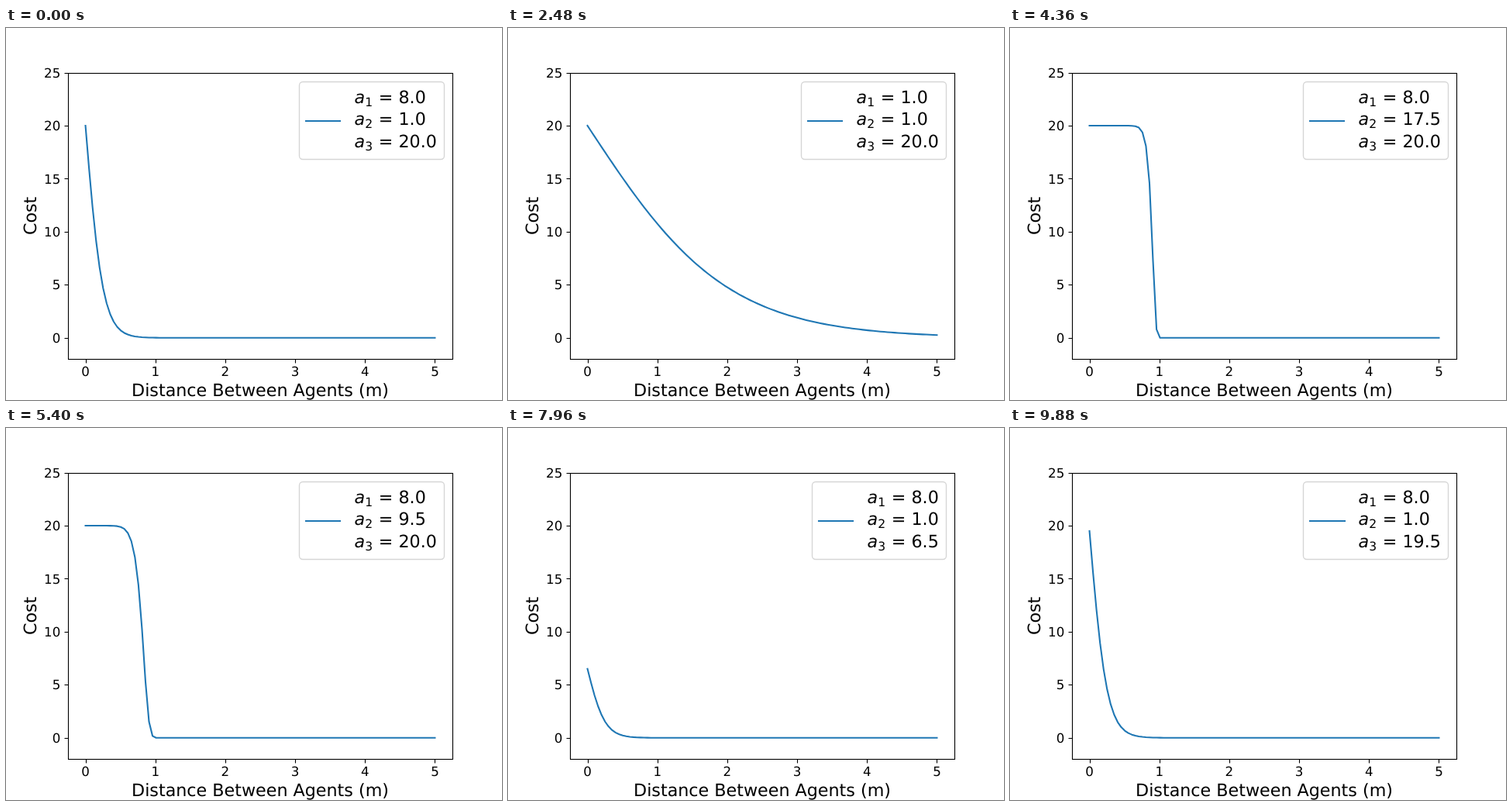
Recreate the animation shown at these times as an HTML page with a canvas. Size 640x480 px, loop 9920 ms.

```html
<!DOCTYPE html>
<html lang="en">
<head>
<meta charset="utf-8">
<title>Cost curve</title>
<style>
  html, body { margin: 0; width: 100%; height: 100%; overflow: hidden; background: #fff; }
  canvas { display: block; width: 640px; height: 480px; }
</style>
</head>
<body>
<canvas id="stage" width="640" height="480"></canvas>
<script>
const ctx = document.getElementById('stage').getContext('2d');
const STEP_MS = 40, STEPS = 248;
const BLUE = '#1f77b4';
const PT = 100 / 72;
const SMALL = 12 * PT, LARGE = 16 * PT;

const px = x => 80 + (x + 0.25) * 496 / 5.5;
const py = y => 427.2 - (y + 2) * 369.6 / 27;

// Rise from start to top, fall to 1, return to start, 0.5 per step.
function sweep(n, start, top) {
  const up = 2 * (top - start), down = 2 * (top - 1);
  if (n <= 0 || n >= 2 * down) return start;
  if (n <= up) return start + n / 2;
  if (n <= up + down) return top - (n - up) / 2;
  return 1 + (n - up - down) / 2;
}

function text(str, x, y, size, align = 'left', style = '') {
  ctx.font = `${style} ${size}px "DejaVu Sans", sans-serif`;
  ctx.textAlign = align;
  ctx.fillText(str, x, y);
}

function line(x1, y1, x2, y2) {
  ctx.beginPath();
  ctx.moveTo(x1, y1);
  ctx.lineTo(x2, y2);
  ctx.stroke();
}

function drawCurve(a1, a2, a3) {
  ctx.strokeStyle = BLUE;
  ctx.lineWidth = 1.5 * PT;
  ctx.lineCap = 'square';
  ctx.lineJoin = 'round';
  ctx.save();
  ctx.beginPath();
  ctx.rect(80, 58, 496, 369);
  ctx.clip();
  ctx.beginPath();
  for (let i = 0; i < 100; i++) {
    const x = 5 * i / 99;
    ctx.lineTo(px(x), py(2 * a3 / (1 + Math.exp(a1 * x ** a2))));
  }
  ctx.stroke();
  ctx.restore();
}

function drawAxes() {
  ctx.strokeStyle = ctx.fillStyle = '#000';
  ctx.lineWidth = 0.8 * PT;
  ctx.lineCap = 'butt';
  ctx.lineJoin = 'miter';
  for (let v = 0; v <= 5; v++) {
    const x = Math.round(px(v)) + 0.5;
    line(x, 427.5, x, 432.5);
    text(v, px(v), 449, SMALL, 'center');

    const y = py(5 * v);
    const tickY = Math.round(y) + 0.5;
    line(75.5, tickY, 80.5, tickY);
    text(5 * v, 70.3, Math.round(y + 6.08), SMALL, 'right');
  }
  ctx.strokeRect(80.5, 58.5, 496, 369);

  text('Distance Between Agents (m)', 328, 475, LARGE, 'center');
  ctx.save();
  ctx.translate(39, 242.4);
  ctx.rotate(-Math.PI / 2);
  text('Cost', 0, 0, LARGE, 'center');
  ctx.restore();
}

function drawLegend(values) {
  const wide = values.some(v => v >= 10);
  const left = wide ? 378.5 : 392.5;
  const a3 = values[2];
  const extra = a3 > 10 && a3 % 1 ? 1 : 0;

  ctx.beginPath();
  ctx.roundRect(left, 69.5, 565.5 - left, 100, 4.44);
  ctx.fillStyle = 'rgba(255,255,255,0.8)';
  ctx.fill();
  ctx.strokeStyle = 'rgba(204,204,204,0.8)';
  ctx.lineWidth = PT;
  ctx.stroke();

  ctx.strokeStyle = BLUE;
  ctx.lineWidth = 2.083;
  ctx.lineCap = 'square';
  line(left + 8.5, 120, left + 52.5 + extra, 120);

  ctx.fillStyle = '#000';
  const x = left + 71.1;
  values.forEach((v, i) => {
    const y = [97, 125, 154][i];
    text('a', x, y, LARGE, 'left', 'italic');
    text(i + 1, x + 13.6, y + 3.6, LARGE * 0.7);
    text(` = ${v.toFixed(1)}`, x + 24.1, y, LARGE);
  });
}

function draw(now) {
  const n = Math.floor(now / STEP_MS) % STEPS;
  const values = [sweep(n, 8, 20), sweep(n - 76, 1, 20), sweep(n - 152, 20, 25)];
  ctx.fillStyle = '#fff';
  ctx.fillRect(0, 0, 640, 480);
  drawCurve(...values);
  drawAxes();
  drawLegend(values);
}

function tick(now) {
  draw(now);
  requestAnimationFrame(tick);
}

ctx.textRendering = 'geometricPrecision';
draw(0);
requestAnimationFrame(tick);
</script>
</body>
</html>
```
